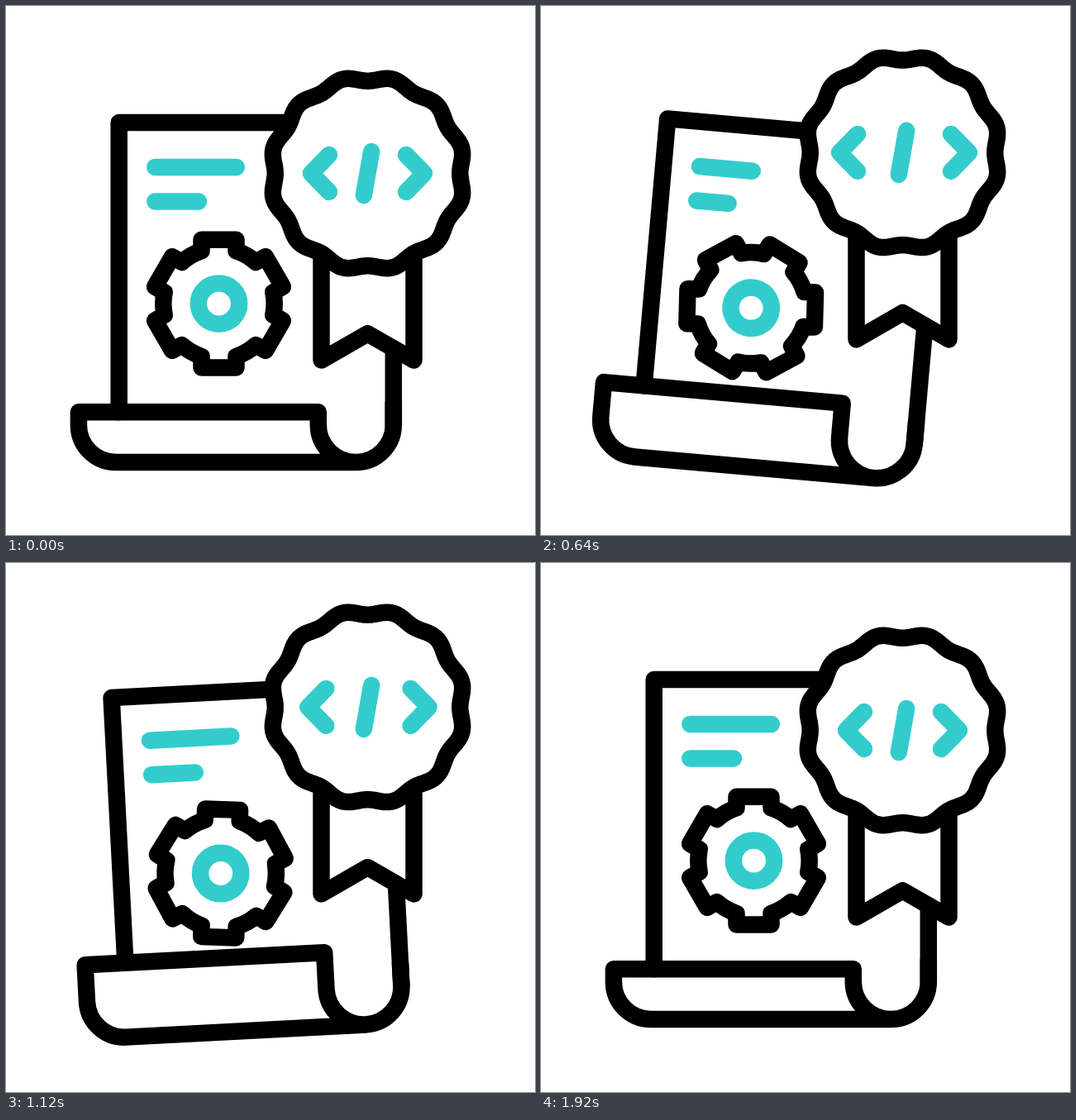
Recreate the animation shown at these times as an HTML page with a canvas. Size 640x640 px, loop 2000 ms.

```html
<!DOCTYPE html>
<html lang="en">
<head>
<meta charset="utf-8">
<title>Code certificate</title>
<style>
html, body { margin: 0; width: 100%; height: 100%; overflow: hidden; background: #fff; }
canvas { display: block; width: 100vmin; height: 100vmin; margin: 0 auto; }
</style>
</head>
<body>
<canvas id="stage" width="640" height="640"></canvas>
<script>
const ctx = document.getElementById('stage').getContext('2d');
const LOOP = 2000, STEP = 40;
const INK = '#000', TEAL = '#33cccc', PAPER = '#fff';
const TAU = Math.PI * 2, RAD = Math.PI / 180;

// Cubic ease (.6, 0, .4, 1): solve for the curve parameter by bisection.
function ease(p) {
  if (p <= 0) return 0;
  if (p >= 1) return 1;
  let lo = 0, hi = 1;
  for (let i = 0; i < 30; i++) {
    const u = (lo + hi) / 2;
    if (1.8 * u - 2.4 * u * u + 1.6 * u * u * u < p) lo = u; else hi = u;
  }
  return lo * lo * (3 - 2 * lo);
}

const ramp = (t, a, b) => ease((t - a) / (b - a));
const pulse = (t, a, b, c, d) => ramp(t, a, b) - ramp(t, c, d);

function stroke(color, width = 20.5) {
  ctx.strokeStyle = color;
  ctx.lineWidth = width;
  ctx.stroke();
}

function line(color, ...pts) {
  ctx.beginPath();
  for (let i = 0; i < pts.length; i += 2) ctx.lineTo(pts[i], pts[i + 1]);
  stroke(color);
}

function drawGear(x, y, angle) {
  const half = 21, tip = 77.3, root = 67.2;
  const edge = Math.asin(half / root);
  ctx.save();
  ctx.translate(x, y);
  ctx.rotate(angle);
  ctx.beginPath();
  for (let i = 0; i < 6; i++) {
    const a = i * TAU / 6, c = Math.cos(a), s = Math.sin(a);
    ctx.arc(0, 0, root, a - TAU / 6 + edge, a - edge);
    ctx.lineTo(c * tip + s * half, s * tip - c * half);
    ctx.lineTo(c * tip - s * half, s * tip + c * half);
    ctx.lineTo(root * Math.cos(a + edge), root * Math.sin(a + edge));
  }
  ctx.closePath();
  stroke(INK);
  ctx.beginPath();
  ctx.arc(0, 0, 24.7, 0, TAU);
  stroke(TEAL);
  ctx.restore();
}

function drawSheet(t, lift) {
  const tilt = 5.1 * ramp(t, 0, 700) - 9.5 * ramp(t, 635, 1346) + 4.4 * ramp(t, 1200, 1830);
  const top = 491.2 - 31 * lift;
  ctx.save();
  ctx.translate(320, 320 + 13 * lift);
  ctx.rotate(tilt * RAD);
  ctx.translate(-320, -320);

  line(INK, 136.7, top, 136.7, 141, 468.8, 141, 468.8, 507);

  // rolled bottom edge
  ctx.beginPath();
  ctx.moveTo(468.8, 480);
  ctx.arc(423.3, 506.5, 45.5, 0, Math.PI);
  ctx.lineTo(377.8, top);
  ctx.lineTo(87.9, top);
  ctx.lineTo(87.9, 507);
  ctx.arc(132.9, 507, 45, Math.PI, Math.PI / 2, true);
  ctx.lineTo(423.3, 552);
  stroke(INK);

  line(TEAL, 180.3, 195, 278.8 - 60 * pulse(t, 165, 515, 480, 820), 195);
  line(TEAL, 180.3, 236.6, 233 - 32 * pulse(t, 478, 818, 734, 1074), 236.6);
  drawGear(257.5, 360.1, (390 * lift - 90) * RAD);
  ctx.restore();
}

function drawBadge(t, lift) {
  ctx.save();
  ctx.translate(437.5, 202.5 - 30 * lift);
  ctx.fillStyle = PAPER;

  ctx.beginPath();
  ctx.moveTo(-56, 60);
  ctx.lineTo(-56, 226);
  ctx.lineTo(0, 193.8);
  ctx.lineTo(56, 226);
  ctx.lineTo(56, 60);
  ctx.fill();
  stroke(INK);

  ctx.beginPath();
  for (let i = 0; i < 360; i++) {
    const a = i * RAD, r = 114.8 - 3 * Math.cos(12 * a);
    ctx.lineTo(r * Math.cos(a), r * Math.sin(a));
  }
  ctx.closePath();
  ctx.fill();
  stroke(INK);

  const open = pulse(t, 230, 610, 925, 1305);
  const left = -46.5 - 8 * open, right = 46.5 + 12 * open;
  line(TEAL, left, -22.5, left - 22, 0, left, 22.5);
  line(TEAL, right, -22.5, right + 22, 0, right, 22.5);
  if (t < 800 || t >= 1040) line(TEAL, 4.7, -26.5, -4.7, 26.5);
  ctx.restore();
}

function frame(now) {
  const t = Math.floor(now % LOOP / STEP) * STEP;
  const lift = pulse(t, 5, 953, 910, 1834);
  ctx.fillStyle = PAPER;
  ctx.fillRect(0, 0, 640, 640);
  ctx.lineCap = ctx.lineJoin = 'round';
  drawSheet(t, lift);
  drawBadge(t, lift);
  requestAnimationFrame(frame);
}
frame(0);
</script>
</body>
</html>
```
